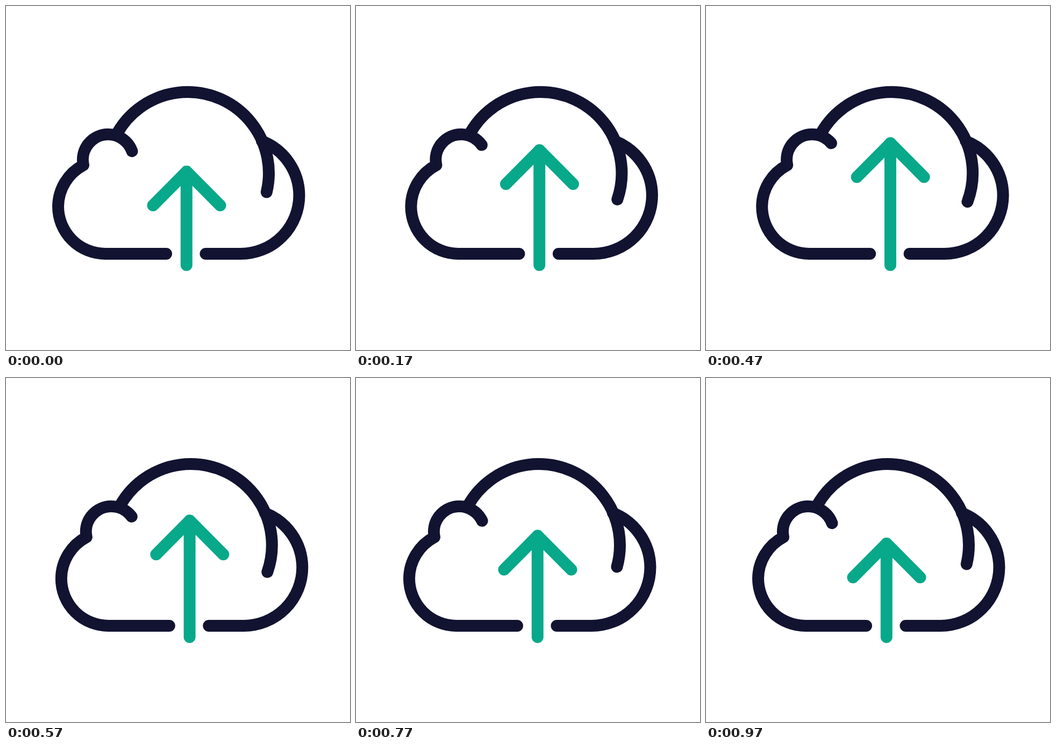
Write an HTML page that moves like this. It is 640 by 640 pixels and loops after 1.01 s.

```html
<!DOCTYPE html>
<html lang="en">
<head>
<meta charset="utf-8">
<title>Cloud upload</title>
<style>
  html, body { margin: 0; width: 100%; height: 100%; overflow: hidden; background: #fff; }
  svg { display: block; width: 100%; height: 100%; }
  path { fill: none; stroke: #121331; stroke-width: 22; stroke-linecap: round; stroke-linejoin: round; }
  .arrow { stroke: #08a88a; }
</style>
</head>
<body>
<svg viewBox="0 0 640 640">
  <g id="icon">
    <path id="left"/>
    <path id="arch"/>
    <path d="M476 251.3A109 109 0 0 1 545.5 352A109 109 0 0 1 436.5 461H371.5"/>
    <path class="arrow" id="shaft"/>
    <path class="arrow" id="head" d="M273.5 371L336 308L398.5 371"/>
  </g>
</svg>
<script>
const LOOP = 1010, PEAK = 8, LAST = 24;
const $ = id => document.getElementById(id);
const icon = $('icon'), left = $('left'), arch = $('arch'), shaft = $('shaft'), head = $('head');

const cubic = (a, b, s) => 3 * (1 - s) * (1 - s) * s * a + 3 * (1 - s) * s * s * b + s * s * s;

function bezier(x1, y1, x2, y2, x) {
  let lo = 0, hi = 1;
  for (let i = 0; i < 30; i++) {
    const mid = (lo + hi) / 2;
    if (cubic(x1, x2, mid) < x) lo = mid; else hi = mid;
  }
  return cubic(y1, y2, lo);
}

// 25 poses a second, shown on a 30 Hz grid rounded to 10 ms
function pose(ms) {
  const tick = Math.floor((Math.floor(ms / 10) * 10 + 5) * 0.03);
  return Math.min(LAST, Math.ceil(tick * 5 / 6 - 0.5 - 1e-6));
}

function lift(k) {
  if (k <= 0 || k >= LAST) return 0;
  return k <= PEAK
    ? bezier(0.167, 0.167, 0.667, 1, k / PEAK)
    : 1 - bezier(0.333, 0, 0.667, 1, (k - PEAK) / (LAST - PEAK));
}

function onCircle(cx, cy, r, deg) {
  const a = deg * Math.PI / 180;
  return (cx + r * Math.cos(a)).toFixed(2) + ' ' + (cy + r * Math.sin(a)).toFixed(2);
}

function draw(p) {
  const rise = 62.5 * p;
  icon.setAttribute('transform', `translate(${8.5 * p} 0)`);
  left.setAttribute('d', 'M298 461H185A88 88 0 0 1 97 373A88 88 0 0 1 144 296' +
    'A47.2 47.2 0 0 1 190 238.8A47.2 47.2 0 0 1 ' + onCircle(190, 286, 47.2, -19.6 - 25 * p));
  arch.setAttribute('d', 'M207 236.5A151 151 0 0 1 338 160A151 151 0 0 1 ' +
    onCircle(338, 311, 151, 13.5 + 8.5 * p));
  shaft.setAttribute('d', `M335.8 482V${308 - rise}`);
  head.setAttribute('transform', `translate(0 ${-rise})`);
}

const start = performance.now();
function tick() {
  draw(lift(pose((performance.now() - start) % LOOP)));
  requestAnimationFrame(tick);
}
tick();
</script>
</body>
</html>
```
